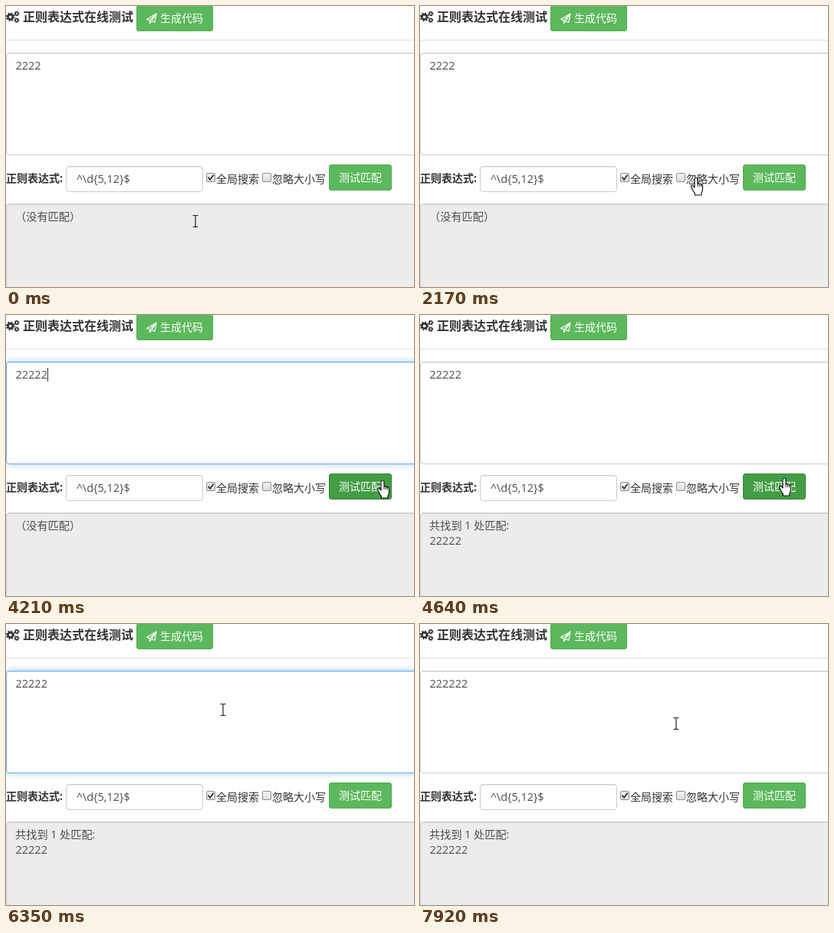
An HTML page for the animation above (8 s loop, 532 px wide and 367 px high).

```html
<!DOCTYPE html>
<html lang="zh">
<head>
<meta charset="utf-8">
<style>
html, body { margin: 0; width: 100%; height: 100%; overflow: hidden; background: #fefefe; }
#stage { position: absolute; left: 0; top: 0; width: 532px; height: 367px; overflow: hidden; }
#stage div, svg { position: absolute; box-sizing: border-box; }
.field { border: 1px solid #ccc; border-radius: 4px; background: #fefefe; box-shadow: inset 0 1px 1px rgba(0,0,0,.075); }
.btn { border: 1px solid #4cae4c; border-radius: 3px; background: #5cb85c; }
.btn.hover { background: #449d44; border-color: #398439; }
.btn.press { background: #398439; border-color: #255625; box-shadow: inset 0 3px 5px rgba(0,0,0,.125); }
.check { width: 12px; height: 12px; top: 218px; border: 1px solid #8c8c8c; border-radius: 2px; background: linear-gradient(#f2f2f2, #dedede); }
text { font: 14px "Open Sans", "Noto Sans CJK SC", "Noto Sans CJK", sans-serif; fill: #333; white-space: pre; }
.bold { font-weight: 700; }
.value { font-size: 14.5px; fill: #4d4d4d; }
.white { fill: #fff; font-weight: 500; }
.grey { fill: #4d4d4d; font-size: 14.2px; }
</style>
</head>
<body>
<div id="stage">
  <div class="btn" style="left:170px;top:-1px;width:100px;height:34px"></div>
  <div style="left:0;top:44px;width:532px;height:1px;background:#e0e0e0"></div>
  <div class="field" id="area" style="left:0;top:61px;width:540px;height:134px"></div>
  <div class="field" style="left:78px;top:209px;width:179px;height:34px"></div>
  <div class="check" style="left:261px"></div>
  <div class="check" style="left:334px"></div>
  <div class="btn" id="test" style="left:421px;top:207px;width:82px;height:34px"></div>
  <div class="field" style="left:0;top:258px;width:540px;height:130px;background:#ececec"></div>
  <svg width="532" height="367">
    <g fill="none" stroke="#333">
      <circle cx="5.7" cy="14.3" r="3.2" stroke-width="2.6"/>
      <circle cx="5.7" cy="14.3" r="4.9" stroke-width="2" stroke-dasharray="1.92"/>
      <g id="cog">
        <circle cx="14" cy="10" r="1.9" stroke-width="1.5"/>
        <circle cx="14" cy="10" r="2.8" stroke-width="1.1" stroke-dasharray="1.1"/>
      </g>
      <use href="#cog" y="8.6"/>
    </g>
    <text x="22" y="19.6" class="bold" style="font-size:16px">正则表达式在线测试</text>
    <path d="M183.5 17.5L196 10L194 21.2L189.8 19.7L187.5 22.5V18.9ZM187.5 18.9L196 10L189.8 19.7" fill="none" stroke="#fff" stroke-width="1.2" stroke-linejoin="round"/>
    <text x="201" y="21" class="white">生成代码</text>
    <text x="12.5" y="82.6" class="value" id="typed"></text>
    <path id="caret" d="M.5 69v18" stroke="#333"/>
    <text x="0" y="230" class="bold">正则表达式:</text>
    <text x="92" y="231" class="value">^\d{5,12}$</text>
    <path d="M263.5 223.5l2.6 3.2 4.6-6.2" fill="none" stroke="#333" stroke-width="1.8"/>
    <text x="274" y="231">全局搜索</text>
    <text x="347" y="231">忽略大小写</text>
    <text x="434" y="229" class="white">测试匹配</text>
    <text x="12" y="280" class="grey" id="summary"></text>
    <text x="12.5" y="299.6" class="value" id="match"></text>
    <g id="cursor">
      <path id="beam" d="M-3.5-7.5h2.6l.9.8.9-.8h2.6M0-7v14M-3.5 7.5h2.6l.9-.8.9.8h2.6" fill="none" stroke="#222" stroke-width="1.2"/>
      <path id="arrow" d="M0 0v16.5l3.8-3.6 2.6 6 2.4-1-2.6-5.9h5.4z" fill="#fff" stroke="#111"/>
      <g id="hand" stroke="#111" stroke-linejoin="round">
        <path d="M-2 13V2a2 2 0 0 1 4 0v6a1.3 1.3 0 0 1 2.3.6a1.3 1.3 0 0 1 2.2.7a1.2 1.2 0 0 1 2 1.2v5q0 3-1.7 4.8v2.7h-8.5v-2.7q-2.5-2.8-4.5-7.6q-.5-2 1-2.3q1.4 0 3.2 2.6z" fill="#fff" stroke-width="1.2"/>
        <path d="M2 8v4M4.3 8.6v3.4M6.5 9.3v3" fill="none" stroke-width=".9"/>
      </g>
    </g>
  </svg>
</div>
<script>
const LOOP = 8000, STEP = 135, PRESS = 145, FADE = 150, BLINK = 530;
const $ = id => document.getElementById(id);

// Pointer stops: time, x, y
const stops = [
  [0, 247, 281], [940, 450, 223], [2060, 450, 223], [2155, 360, 224],
  [2965, 97, 112], [3640, 243, 112], [4180, 491, 216], [5125, 453, 209],
  [5665, 283, 112], [6340, 283, 112], [6880, 447, 225], [7420, 447, 225],
  [7825, 334, 130]
];
const testClicks = [1620, 4360, 7250];
const areaClicks = [3060, 5750];
const keyPresses = [3800, 6460];

const clamp = v => Math.max(0, Math.min(1, v));
const lastOf = (times, t) => Math.max(-Infinity, ...times.filter(s => s <= t));
const digits = t => '2'.repeat(4 + keyPresses.filter(s => s <= t).length);
const show = (id, on) => $(id).style.display = on ? '' : 'none';

function over(x, y, left, top, right, bottom) {
  return x >= left && x < right && y >= top && y < bottom;
}

// The screen refreshes the pointer at a fixed step
function pointer(time) {
  const t = Math.max(0, Math.floor((time + 5) / STEP) * STEP - 5);
  const i = stops.findIndex(s => s[0] > t);
  const [t1, x1, y1] = stops.at(i);
  if (i < 0) return [x1, y1];
  const [t0, x0, y0] = stops[i - 1];
  const k = (t - t0) / (t1 - t0);
  return [x0 + (x1 - x0) * k, y0 + (y1 - y0) * k].map(Math.round);
}

function drawPointer(t, pressed) {
  const [x, y] = pointer(t);
  const onTest = over(x, y, 421, 207, 503, 241);
  const link = onTest || over(x, y, 261, 216, 417, 238);
  const field = over(x, y, 0, 61, 532, 195) || over(x, y, 78, 209, 257, 243) || y >= 258;
  show('hand', link);
  show('beam', field);
  show('arrow', !link && !field);
  $('cursor').setAttribute('transform', `translate(${x} ${y})`);
  $('test').className = 'btn' + (onTest ? pressed ? ' press' : ' hover' : '');
}

function drawFocus(focused, since) {
  const k = clamp(since / FADE), f = focused ? k : 1 - k;
  const mix = v => Math.round(204 + (v - 204) * f);
  const style = $('area').style;
  style.borderColor = `rgb(${mix(102)},${mix(175)},${mix(233)})`;
  style.boxShadow = `inset 0 1px 1px rgba(0,0,0,.075), 0 0 8px rgba(102,175,233,${.6 * f})`;
}

function draw(t) {
  const tested = lastOf(testClicks, t), entered = lastOf(areaClicks, t);
  const focused = entered > tested;
  drawPointer(t, t - tested < PRESS);
  drawFocus(focused, t - Math.max(tested, entered, -FADE));

  const value = digits(t);
  $('typed').textContent = value;
  const idle = t - Math.max(entered, lastOf(keyPresses, t));
  show('caret', focused && idle % (2 * BLINK) < BLINK);
  $('caret').setAttribute('transform', `translate(${Math.round(12.5 + value.length * 8.3)} 0)`);

  const result = digits(lastOf(testClicks, t - PRESS));
  const match = /^\d{5,12}$/.test(result);
  $('summary').textContent = match ? '共找到 1 处匹配:' : '（没有匹配）';
  $('match').textContent = match ? result : '';
}

const start = performance.now();
function tick() {
  draw((performance.now() - start) % LOOP);
  requestAnimationFrame(tick);
}
tick();
</script>
</body>
</html>
```
